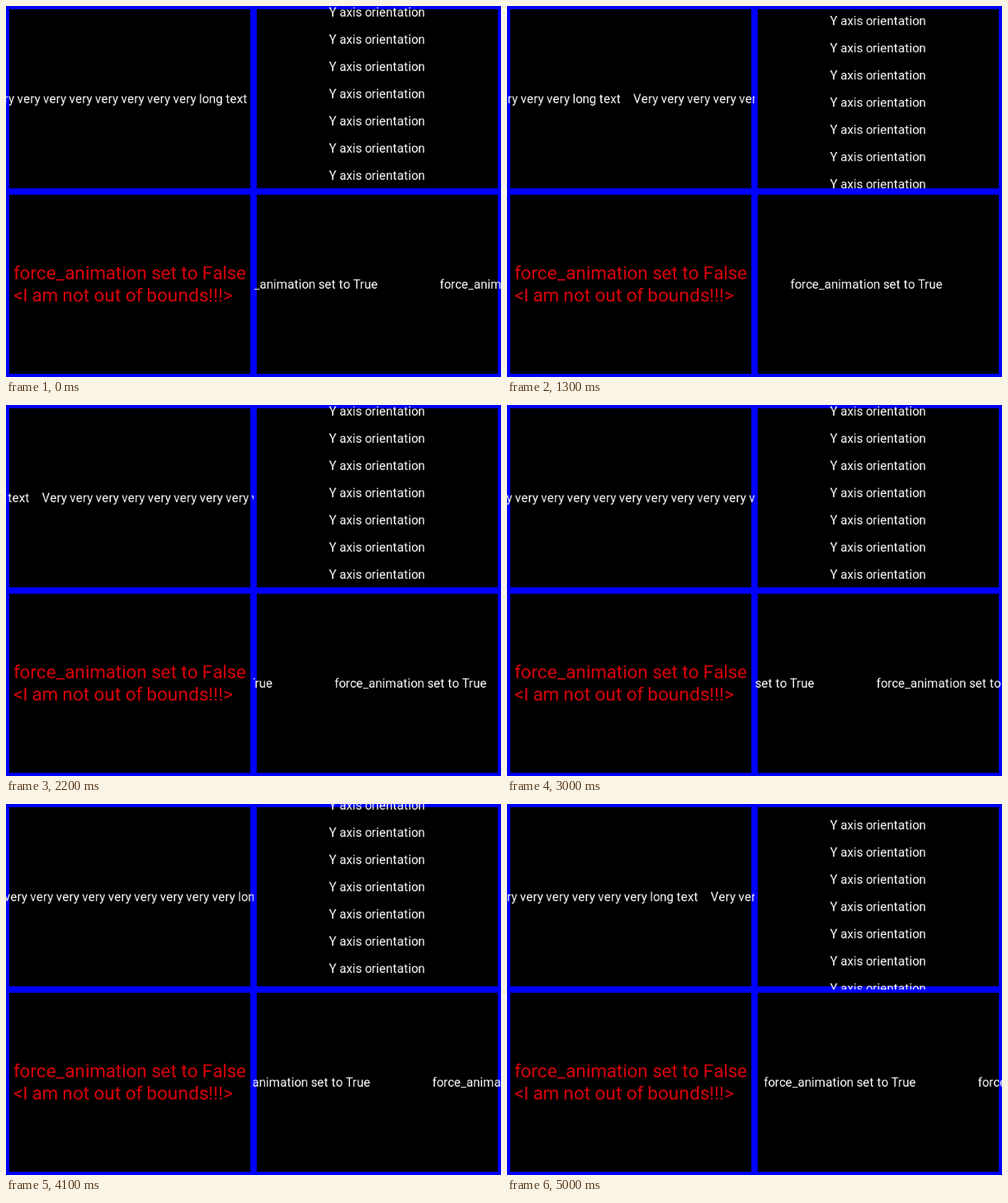
Recreate the animation shown at these times as an HTML page with a canvas. Size 600x450 px, loop 5.1 s.

```html
<!DOCTYPE html>
<html lang="en">
<head>
<meta charset="utf-8">
<title>Scrolling labels</title>
<style>
  html, body { margin: 0; width: 100%; height: 100%; overflow: hidden; background: #000; }
  canvas { display: block; width: 600px; height: 450px; }
</style>
</head>
<body>
<canvas id="stage" width="800" height="600"></canvas>
<script>
const ctx = document.getElementById('stage').getContext('2d');
const LOOP = 5100, STEP = 100, PANEL_W = 400, PANEL_H = 300;

// Scroll distance in px over time in ms; the pace drifts slightly.
const PACE = [[0, 0], [800, 62], [1300, 103], [2200, 176], [3000, 242], [4100, 334], [5000, 406]];

function distance(time) {
  const i = Math.max(1, PACE.findIndex(([t]) => t >= time));
  const [t0, d0] = PACE[i - 1], [t1, d1] = PACE[i];
  return Math.round(d0 + (d1 - d0) * (time - t0) / (t1 - t0));
}

// Lays glyphs out on whole pixels, with advance and kerning rounded separately.
function layout(text, size) {
  const font = `${size}px Roboto, sans-serif`;
  ctx.font = font;
  const measure = s => ctx.measureText(s).width;
  let width = 0;
  const glyphs = [...text].map((char, i) => {
    const next = text[i + 1] || '', x = width;
    const advance = measure(char);
    const kern = next ? measure(char + next) - advance - measure(next) : 0;
    width += Math.round(advance) + Math.round(kern);
    return { char, x };
  });
  return { font, glyphs, width };
}

function drawText(label, x, baseline, color = '#fff') {
  ctx.font = label.font;
  ctx.fillStyle = color;
  for (const g of label.glyphs) ctx.fillText(g.char, x + g.x, baseline);
}

const longLabel = layout('Very ' + 'very '.repeat(14) + 'long text', 20);
const axisLabel = layout('Y axis orientation', 20);
const forcedLabel = layout('force_animation set to True', 20);
const stillLines = ['force_animation set to False', '<I am not out of bounds!!!>'].map(s => layout(s, 30));

// Calls draw(position) for each repeat of a strip that can reach the panel.
function tile(offset, period, end, draw) {
  const start = ((offset % period) + period) % period - period;
  for (let p = start; p < end; p += period) draw(p);
}

function panel(col, row, draw) {
  ctx.save();
  ctx.translate(col * PANEL_W, row * PANEL_H);
  ctx.beginPath();
  ctx.rect(0, 0, PANEL_W, PANEL_H);
  ctx.clip();
  ctx.strokeStyle = '#00f';
  ctx.lineWidth = 10;
  ctx.strokeRect(0, 0, PANEL_W, PANEL_H);
  draw();
  ctx.restore();
}

function render(time) {
  const d = distance(time);
  ctx.fillStyle = '#000';
  ctx.fillRect(0, 0, 800, 600);

  panel(0, 0, () => tile(410 - 2 * d, longLabel.width + 20, PANEL_W,
    x => drawText(longLabel, x, 157)));

  panel(1, 0, () => tile(17 - 2 * d, 44, PANEL_H + 20,
    y => drawText(axisLabel, Math.floor((PANEL_W - axisLabel.width) / 2), y)));

  panel(0, 1, () => stillLines.forEach((line, i) => drawText(line, 12, 142 + 36 * i, '#dc000c')));

  panel(1, 1, () => tile(d - 45, forcedLabel.width + 100, PANEL_W,
    x => drawText(forcedLabel, x, 157)));
}

let shown = -1;
function tick() {
  const time = Math.floor(performance.now() % LOOP / STEP) * STEP;
  if (time !== shown) render(shown = time);
  requestAnimationFrame(tick);
}
tick();
</script>
</body>
</html>
```
